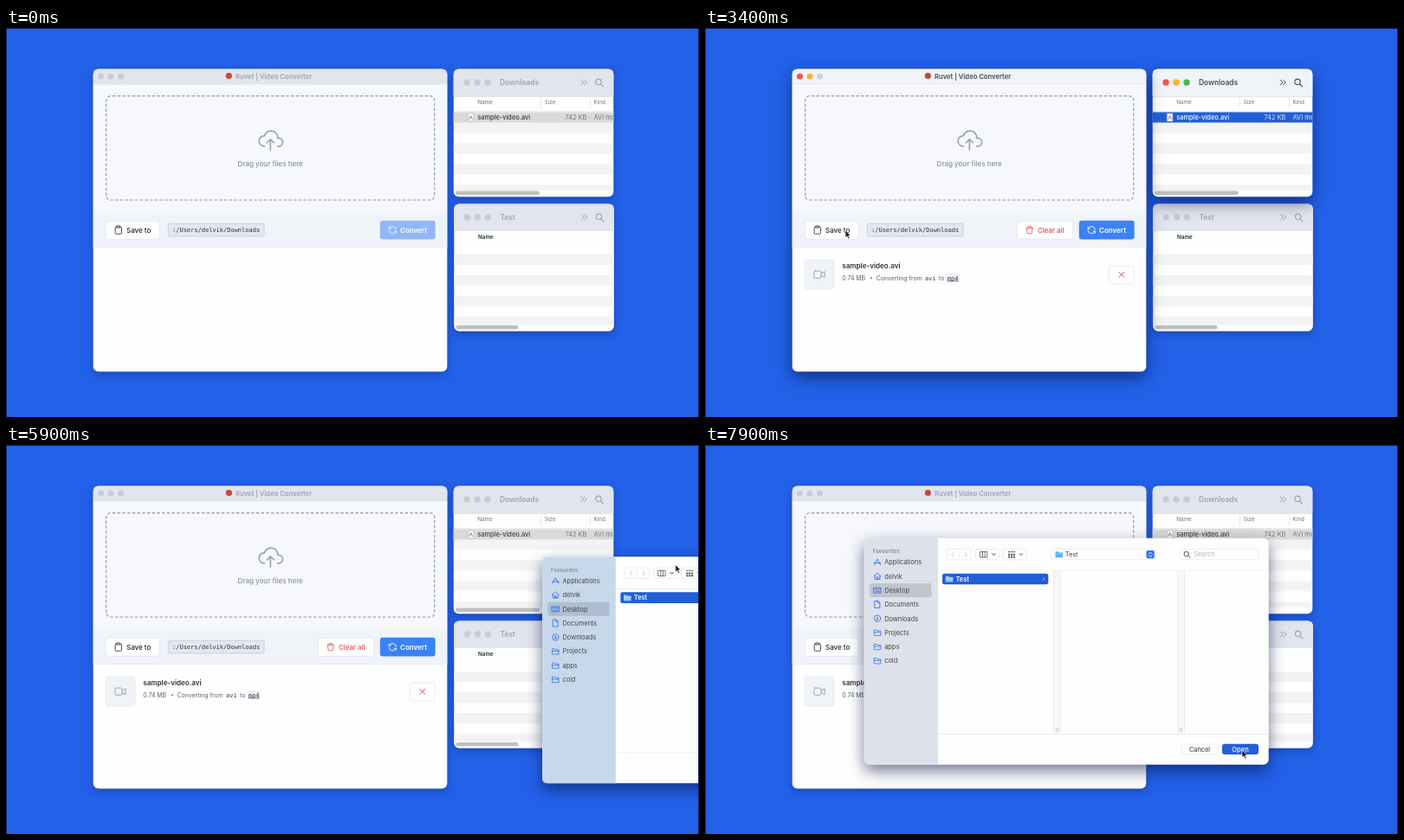
These frames come from a looping animation (800 by 450 pixels, 8 s). An HTML page:

```html
<!DOCTYPE html>
<html lang="en">
<head>
<meta charset="utf-8">
<title>Video Converter</title>
<style>
html, body { margin: 0; width: 100%; height: 100%; overflow: hidden; background: #2361e8; }
svg { display: block; width: 800px; height: 450px; }
text { font-family: Inter, sans-serif; white-space: pre; }
.mono { font-family: "DejaVu Sans Mono", monospace; }
.win { --bar: #e1e5ee; --ink: #a0a4ae; --sel: #dadada; --selInk: #3c3e42; --selDim: #77797e;
  --r: #c9ccd4; --y: #c9ccd4; --g: #c9ccd4; }
.win.on { --bar: #f0f3f8; --ink: #484b52; --sel: #215fda; --selInk: #fff; --selDim: #dbe6fc;
  --r: #f4564d; --y: #f6b42e; --g: #4fb947; }
.fixed.on { --g: #cdd0d8; }
.base { filter: drop-shadow(0 3px 5px rgba(0, 10, 60, .3)); }
.on > .base { filter: drop-shadow(0 7px 9px rgba(0, 10, 60, .56)); }
.off { display: none; }
</style>
</head>
<body>
<svg id="stage" viewBox="0 0 800 450"></svg>
<script>
const LOOP = 8000, STEP = 100;
const BLUE = '#3b7bf0', RED = '#e5484d';

const text = (x, y, s, size = 7.4, weight = 400, fill = '#3c3e42', more = '') =>
  `<text x="${x}" y="${y}" font-size="${size}" font-weight="${weight}" fill="${fill}" ${more}>${s}</text>`;
const mono = (x, y, s, fill, more = '') => text(x, y, s, 7, 400, fill, `class="mono" ${more}`);
const rect = (x, y, w, h, fill, r = 0, more = '') =>
  `<rect x="${x}" y="${y}" width="${w}" height="${h}" rx="${r}" fill="${fill}" ${more}/>`;
const line = (d, stroke, width = 1, more = '') =>
  `<path d="${d}" fill="none" stroke="${stroke}" stroke-width="${width}" stroke-linecap="round" stroke-linejoin="round" ${more}/>`;
const dot = (x, y, r, fill) => `<circle cx="${x}" cy="${y}" r="${r}" fill="${fill}"/>`;
const group = (id, body, more = '') => `<g id="${id}" ${more}>${body}</g>`;
const button = (x, y, w, h, fill = '#fff', r = 3) =>
  rect(x + .25, y + .25, w - .5, h - .5, fill, r, 'stroke="#dfe4ec" stroke-width=".7"');
const lights = (x, y, gap, r) =>
  ['r', 'y', 'g'].map((c, i) => dot(x + i * gap, y, r, `var(--${c})`)).join('');
// Window body with a coloured bar of height `bar` on top.
const frame = (x, y, w, h, bar, r = 6) => rect(x, y, w, h, '#fefefe', r, 'class="base"') +
  `<path d="M${x} ${y + bar}v${r - bar}q0-${r} ${r}-${r}h${w - 2 * r}q${r} 0 ${r} ${r}v${bar - r}z" fill="var(--bar)"/>`;
const lens = (x, y, r, color, w) =>
  line(`M${x + r} ${y}a${r} ${r} 0 1 0 ${-2 * r} 0a${r} ${r} 0 1 0 ${2 * r} 0M${x + r * .7} ${y + r * .7}l${r} ${r}`, color, w);
const chevron = (x, y, color = '#4a4c52') => line(`M${x - 1.8} ${y - 1}l1.8 2 1.8-2`, color, 1);
const folder = (x, y, color) =>
  line(`M${x - 3.8} ${y + 3}v-6h2.8l1 1.2h3.8v4.8zM${x - 3.8} ${y - .2}h7.6`, color, .85);
const solidFolder = (x, y, fill, edge) =>
  `<path d="M${x - 4.3} ${y + 3.6}v-7h3.2l1 1.2h4.4v5.8z" fill="${fill}"/>` + rect(x - 4.3, y - 1, 8.6, .8, edge);
const doc = (x, y) => rect(x, y, 6.6, 9, '#fff', .6, 'stroke="#a9a9a9" stroke-width=".6"') +
  line(`M${x + 1.6} ${y + 6.5}l1.7-3.8 1.7 3.8`, '#9b5a45', .9);

// Outline icons on a 24 px grid, centred on (x, y).
const icons = {
  cloud: 'M7 18a4.600 4.400 0 0 1 0-9a5 4.500 0 0 1 11 2h1a3.500 3.500 0 0 1 0 7h-1M9 15l3-3 3 3M12 12v9',
  refresh: 'M20 11a8.100 8.100 0 0 0-15.500-2m-.5-4v4h4M4 13a8.100 8.100 0 0 0 15.500 2m.5 4v-4h-4',
  clipboard: 'M9 5h-2a2 2 0 0 0-2 2v12a2 2 0 0 0 2 2h10a2 2 0 0 0 2-2v-12a2 2 0 0 0-2-2h-2M9 3h6v4h-6z',
  trash: 'M4 7h16M5 7l1 12a2 2 0 0 0 2 2h8a2 2 0 0 0 2-2l1-12M9 7v-4h6v4',
  camera: 'M15 10l6-3v10l-6-3M5 6h8a2 2 0 0 1 2 2v8a2 2 0 0 1-2 2h-8a2 2 0 0 1-2-2v-8a2 2 0 0 1 2-2z'
};
const icon = (name, x, y, scale, color, width) =>
  line(icons[name], color, width / scale, `transform="translate(${x - 12 * scale} ${y - 12 * scale}) scale(${scale})"`);

function converter() {
  return frame(100.7, 47.6, 408.6, 350, 17.2) +
    rect(100.7, 64.8, 408.6, 148.2, '#f6f8fc') + rect(100.7, 64.5, 408.6, .6, '#d5d9e2') +
    lights(109.5, 56, 11.5, 3.5) + dot(257.3, 55.3, 3.6, '#c8483a') +
    text(265, 58.6, 'Ruvet | Video Converter', 7.65, 600, 'var(--ink)') +
    line('M115.700 194v-110.400a5 5 0 0 1 5-5h369a5 5 0 0 1 5 5v110.400a5 5 0 0 1-5 5h-369a5 5 0 0 1-5-5z',
      '#8f97a7', 1.15, 'style="stroke-linecap: butt" stroke-dasharray="3.43 2.294"') +
    icon('cloud', 305.3, 128.7, 1.36, '#9aa1b1', 1.6) +
    text(305.2, 160, 'Drag your files here', 8, 500, '#8a91a2', 'text-anchor="middle"') +
    rect(100.7, 213, 408.6, 41, '#f0f3f8') + rect(100.7, 253.5, 408.6, .6, '#e6eaf0') +
    button(115, 223, 62.5, 21.5) + icon('clipboard', 129.8, 233.6, .52, '#353a44', .9) +
    text(139, 236.7, 'Save to', 8, 500, '#20242c') +
    rect(187.3, 226.3, 110.7, 14.7, '#e2e7f0', 2, 'stroke="#c3cbd9" stroke-width=".8"') +
    mono(192, 236.2, ':/Users/delvik/Downloads', '#2b3342') +
    group('convert', rect(431.8, 222.8, 63.8, 21.7, '#3b82f6', 3) + icon('refresh', 446.2, 233.7, .52, '#fff', .9) +
      text(455, 236.7, 'Convert', 8, 600, '#fff')) +
    group('item',
      button(360, 223, 65, 21.5) + icon('trash', 374.7, 233.6, .46, RED, .8) +
      text(384, 236.7, 'Clear all', 7.9, 500, RED) +
      rect(115.3, 268.3, 33.5, 33.5, '#f0f3f8', 3, 'stroke="#e2e7ee" stroke-width=".8"') +
      icon('camera', 132, 285.2, .68, '#9ba2b0', .95) +
      text(158.3, 278, 'sample-video.avi', 8.05, 600, '#30343c') +
      text(158.3, 291.5, '0.74 MB', 6.95, 400, '#5a6170') + dot(192, 289.2, .9, '#5a6170') +
      text(197.7, 291.5, 'Converting from', 6.9, 400, '#5a6170') + mono(254, 291.5, 'avi', '#343a46') +
      text(270, 291.5, 'to', 6.9, 400, '#5a6170') + rect(278, 284, 16, 10, '#eef1f6', 1.5) +
      mono(279.8, 291.5, 'mp4', '#343a46', 'text-decoration="underline"') +
      button(466, 275, 29.5, 21) + line('M477.800 282.300l6 6m0-6l-6 6', RED, 1));
}

// A file browser: grey rows begin at `list`, each row is 12 px high.
function browser(x, y, h, title, bar, list, thumb, rows) {
  let stripes = '';
  for (let r = list; r < y + h - 9; r += 24) stripes += rect(x, r, 184, Math.min(12, y + h - 7 - r), '#f3f3f4');
  return frame(x - .3, y - .4, 184.6, h + .6, bar + .4) +
    rect(x, y + bar, 184, .6, '#d6d8de') + stripes +
    rect(x + 2, y + h - 6.5, thumb, 4.6, '#bfbfc1', 2.3) +
    lights(x + 15, y + 15, 12, 3.7) + text(x + 53, y + 18, title, 8.35, 600, 'var(--ink)') +
    line(`M${x + 147} ${y + 12.2}l3 2.8-3 2.8M${x + 150.5} ${y + 12.2}l3 2.8-3 2.8`, 'var(--ink)', 1) +
    lens(x + 167, y + 14.3, 3.2, 'var(--ink)', 1.1) + rows;
}

const downloads = () => browser(517, 48, 147, 'Downloads', 31, 109.4, 97,
  text(544.3, 88.3, 'Name', 6.3, 400, '#6f7277') + text(621.7, 88.3, 'Size', 6.3, 400, '#6f7277') +
  text(678.5, 88.3, 'Kind', 6.3, 400, '#6f7277') +
  rect(617, 81, .7, 12, '#dcdcde') + rect(674, 81, .7, 12, '#dcdcde') + rect(517, 96, 184, .6, '#e2e2e4') +
  rect(516.7, 97.4, 184.6, 12, 'var(--sel)') + doc(533.3, 98.9) +
  text(544.3, 106.2, 'sample-video.avi', 7.4, 500, 'var(--selInk)') +
  text(670.3, 106.2, '742 KB', 7.4, 400, 'var(--selDim)', 'text-anchor="end"') +
  text(678.5, 106.2, 'AVI movie', 7.4, 400, 'var(--selDim)', 'clip-path="url(#edge)"'));

const testFolder = () => browser(517.5, 204, 146.5, 'Test', 30, 262, 72,
  text(545, 243.7, 'Name', 6.3, 600, '#2c2e33'));

// Sidebar pictograms, centred on (0, 0).
const glyphs = {
  Applications: 'M-3.500 3l3.500-6.500 3.500 6.500M-4 1h8',
  delvik: 'M-4 0l4-3.700 4 3.700M-2.900-.7v4.200h5.800v-4.200M-.8 3.500v-2.500h1.600v2.500',
  Desktop: 'M-4-3h8v6h-8zM-4-1.200h8M-2.500 1.500h5',
  Documents: 'M-2.800-4h3.400l2.200 2.200v5.800h-5.600zM.6-4v2.200h2.200',
  Downloads: 'M3.700 0a3.700 3.700 0 1 0-7.400 0a3.700 3.700 0 1 0 7.400 0M0-1.800v3.400M-1.400.4l1.400 1.400 1.400-1.400'
};

function dialog() {
  const places = ['Applications', 'delvik', 'Desktop', 'Documents', 'Downloads', 'Projects', 'apps', 'cold'];
  const list = places.map((name, i) => {
    const y = 27.5 + i * 16.3;
    return (glyphs[name] ? line(glyphs[name], BLUE, .95, `transform="translate(15 ${y})"`) : folder(15, y, BLUE)) +
      text(23.2, y + 2.8, name, 7.4, 400, '#44474e');
  }).join('');
  const splitter = x => rect(x, 37, 8.5, 189, '#f7f7f8') + rect(x, 37, .6, 189, '#e4e4e6') +
    rect(x + 8, 37, .6, 189, '#e4e4e6') + line(`M${x + 3.3} 219.5v4M${x + 5.5} 219.5v4`, '#b9b9bd', .7);
  const grid = [0, 1, 2].map(r => [0, 1, 2].map(c =>
    rect(166 + c * 2.9, 15 + r * 2.8, 2.1, r ? 2 : 1.2, '#55575d')).join('')).join('');
  return rect(-.3, -.3, 467, 262, '#fefefe', 6, 'class="base"') +
    '<path id="side" d="M84-.3h-78.300q-6 0-6 6v250q0 6 6 6h78.300z"/>' +
    rect(84, 0, .6, 261.5, '#cfd3db') +
    text(9.7, 17, 'Favourites', 6.15, 600, '#8b8f98') + rect(6, 52, 71.5, 16, '#1c2430', 3, 'opacity=".15"') + list +
    rect(84, 36.7, 382.5, .6, '#e6e6e8') + rect(84, 226, 382.5, .6, '#e0e0e2') +
    button(95, 12, 28.5, 13) + rect(109, 14, .6, 9, '#e2e2e5') +
    line('M103 16.300l-2 2.300 2 2.300M116 16.300l2 2.300-2 2.300', '#b9bbc1', .9) +
    button(128, 12, 27.5, 13) + line('M133.800 15.500h8v6.300h-8zM136.500 15.500v6.300M139.100 15.500v6.300', '#55575d', .8) +
    chevron(149.3, 18.6) + button(160, 12, 27.5, 13) + grid + chevron(181, 18.6) +
    button(215, 12, 121.5, 13) + solidFolder(224.8, 18.6, '#5fb0ee', '#9ad2fa') + text(231.8, 21.2, 'Test', 7.3) +
    rect(325.5, 14, 9.3, 9.3, '#2f74ee', 2) + line('M328.500 17.700l1.700-1.700 1.700 1.700M328.500 19.700l1.700 1.700 1.700-1.700', '#fff', .9) +
    button(364, 12, 91, 13) + lens(371.7, 18, 2.7, '#55575d', 1) + text(380, 21.2, 'Search', 7.4, 400, '#b3b5bb') +
    splitter(218.5) + splitter(361) +
    rect(90, 40.7, 122.3, 12.6, '#215fd8', 2.5) + solidFolder(98, 47, '#8fc8f6', '#c3e4fc') +
    text(105.5, 49.7, 'Test', 7.4, 600, '#fff') + line('M206.500 45.400l1.400 1.600-1.400 1.600', '#b9cff6', .8) +
    button(366, 237.8, 42.3, 12.2) + text(387, 246.7, 'Cancel', 7.4, 400, '#303238', 'text-anchor="middle"') +
    '<rect id="open" x="413" y="237.8" width="42" height="12.2" rx="3"/>' +
    text(434, 246.7, 'Open', 7.5, 500, '#fff', 'text-anchor="middle"');
}

const stage = document.getElementById('stage');
stage.innerHTML = '<clipPath id="edge"><rect x="517" y="90" width="184" height="30"/></clipPath>' +
  rect(0, 0, 800, 450, '#2361e8') +
  group('test', testFolder(), 'class="win"') + group('downloads', downloads(), 'class="win"') +
  group('main', converter(), 'class="win fixed"') +
  group('ghost', doc(-54.7, -7.5) + text(-43.7, 0, 'sample-video.avi', 7.4, 500, '#26282d'), 'opacity=".6"') +
  group('dialog', dialog(), 'class="on"') +
  group('cursor', '<path d="M0 0v8.600l2-1.800 1.400 3.100 1.500-.7-1.400-3h2.700z" fill="#111" stroke="#fff" stroke-width=".7" stroke-linejoin="round"/>') +
  rect(0, 0, 800, 1, '#0c1f55') + rect(0, 0, .8, 450, '#0c1f55') + rect(799.1, 0, .9, 450, '#0c1f55');

const $ = id => document.getElementById(id);
const linear = p => p, smooth = p => p * p * (3 - 2 * p), brake = p => 1 - (1 - p) ** 2;

// [time, x, y, easing towards this point]
const pointer = [
  [0, 812, 300], [200, 812, 300], [900, 588, 106, smooth], [1300, 587.5, 106],
  [1800, 482, 136, smooth], [2200, 308, 148, smooth], [2400, 308, 148], [3300, 162, 234, smooth],
  [4300, 162, 234], [4800, 400, 219, smooth], [5300, 923.5, 139, smooth], [5800, 923.5, 139],
  [6100, 471.5, 137.3], [6300, 338, 116, brake], [6700, 338, 116], [7600, 620, 353, smooth], [8000, 620, 353]
];
const sheet = [[0, 770, 130], [5800, 770, 130], [6100, 318, 129], [6300, 184, 108, brake], [8000, 184, 108]];

function at(track, t) {
  const i = track.findIndex((k, n) => n && t <= k[0]);
  const [t0, x0, y0] = track[i - 1], [t1, x1, y1, ease = linear] = track[i];
  const p = ease((t - t0) / (t1 - t0));
  return [x0 + (x1 - x0) * p, y0 + (y1 - y0) * p];
}
const move = (id, [x, y]) => $(id).setAttribute('transform', `translate(${x} ${y})`);
const show = (id, on) => $(id).classList.toggle('off', !on);
const focus = (id, on) => $(id).classList.toggle('on', on);
const between = (t, a, b) => t >= a && t < b;

function draw(t) {
  const hand = at(pointer, t), pos = at(sheet, t);
  move('cursor', hand);
  move('ghost', hand);
  move('dialog', pos);
  focus('downloads', between(t, 1000, 3500));
  focus('main', between(t, 3400, 4400));
  show('ghost', between(t, 1400, 2200));
  show('item', t >= 2200);
  show('dialog', t >= 4400);
  $('convert').setAttribute('opacity', t < 2200 ? .52 : 1);
  // The translucent sidebar picks up the blue behind it.
  const p = Math.min(1, (770 - pos[0]) / 400), mix = (a, b) => Math.round(a + (b - a) * p);
  $('side').setAttribute('fill', `rgb(${mix(188, 221)},${mix(211, 225)},${mix(237, 233)})`);
  $('open').setAttribute('fill', t >= 7800 ? '#2460d6' : '#3a80f4');
}

const start = performance.now();
function tick() {
  const t = (performance.now() - start) % LOOP;
  draw(Math.floor(t / STEP) * STEP);
  requestAnimationFrame(tick);
}
draw(0);
requestAnimationFrame(tick);
</script>
</body>
</html>
```
